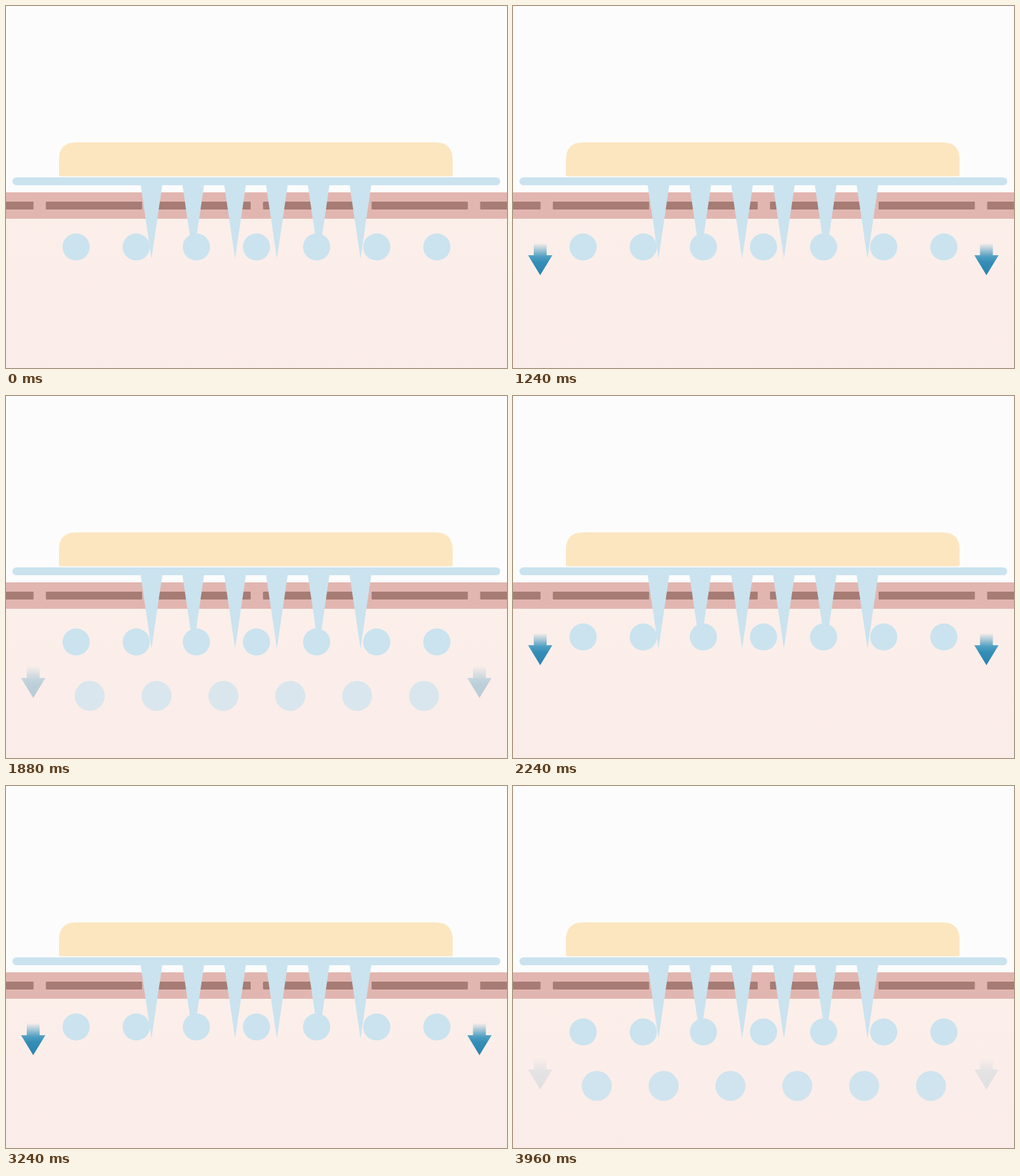
Write an HTML page that moves like this. It is 700 by 507 pixels and loops after 4 s.

```html
<!DOCTYPE html>
<html lang="en">
<head>
<meta charset="utf-8">
<title>Patch absorption</title>
<style>
  html, body { margin: 0; width: 100%; height: 100%; overflow: hidden; background: #fcfcfc; }
  svg { display: block; width: 700px; height: 507px; }
</style>
</head>
<body>
<svg viewBox="0 0 700 507">
  <defs>
    <linearGradient id="dermis" x1="0" y1="0" x2="0" y2="1">
      <stop offset="0" stop-color="#fcefea"/>
      <stop offset="1" stop-color="#faece9"/>
    </linearGradient>
    <linearGradient id="blue" gradientUnits="userSpaceOnUse" x1="0" y1="0" x2="0" y2="45">
      <stop offset="0" stop-color="#3d9ac2" stop-opacity="0"/>
      <stop offset=".42" stop-color="#3d96bd" stop-opacity=".9"/>
      <stop offset=".6" stop-color="#338db6"/>
      <stop offset="1" stop-color="#2a83ae"/>
    </linearGradient>
    <path id="arrow" d="M-9 0H9V17H17L0 45L-17 17H-9Z" fill="url(#blue)"/>
  </defs>
  <rect y="298" width="700" height="209" fill="url(#dermis)"/>
  <rect y="261" width="700" height="37" fill="#e2b6b0"/>
  <g id="dashes" fill="#a67c74"></g>
  <path d="M74 236V215Q74 191 98 191H600Q624 191 624 215V236Q624 238.500 621.500 238.500H76.500Q74 238.500 74 236Z" fill="#fce6c0"/>
  <g fill="#cae3ef">
    <rect x="9" y="240" width="681.500" height="11" rx="5.500"/>
    <g id="needles"></g>
    <g id="upper"></g>
    <g id="lower"></g>
  </g>
  <g id="arrows">
    <use href="#arrow" x="38"/>
    <use href="#arrow" x="661.500"/>
  </g>
</svg>
<script>
const el = id => document.getElementById(id);
const fill = (id, count, shape) => {
  el(id).innerHTML = Array.from({ length: count }, (_, i) => shape(i)).join('');
};
const clamp = v => Math.min(1, Math.max(0, v));

fill('dashes', 6, i => `<rect x="${-96 + 151.7 * i}" y="274" width="134.500" height="11" rx="1"/>`);
fill('needles', 6, i => `<path d="M${188 + 58.4 * i} 250h30.500l-15.200 104z"/>`);
fill('upper', 7, i => `<circle cx="${98 + 84 * i}" cy="337.500" r="19"/>`);
fill('lower', 6, i => `<circle cx="${117 + 93.4 * i}" cy="420" r="21"/>`);

const STEP = 40, LOOP = 4000, CYCLE = 1000, REST = 200;

function draw(now) {
  const t = Math.floor((now % LOOP) / STEP) * STEP;
  // Each cycle rests, then runs; the loop cuts the last cycle one step short.
  const run = (t < STEP ? 0 : (t - STEP) % CYCLE) - REST;
  const active = run >= 0;
  const sink = clamp(run / 320);
  const glide = 1 - (1 - clamp(run / 900)) ** 2;
  const swap = clamp((run - 360) / 410);

  el('upper').setAttribute('transform', `translate(0 ${7 * sink})`);
  el('lower').setAttribute('opacity', swap);
  el('arrows').setAttribute('transform', `translate(0 ${332 + 50 * glide})`);
  el('arrows').setAttribute('opacity', active ? 1 - swap : 0);
}

const start = performance.now();
function tick() {
  draw(performance.now() - start);
  requestAnimationFrame(tick);
}
tick();
</script>
</body>
</html>
```
